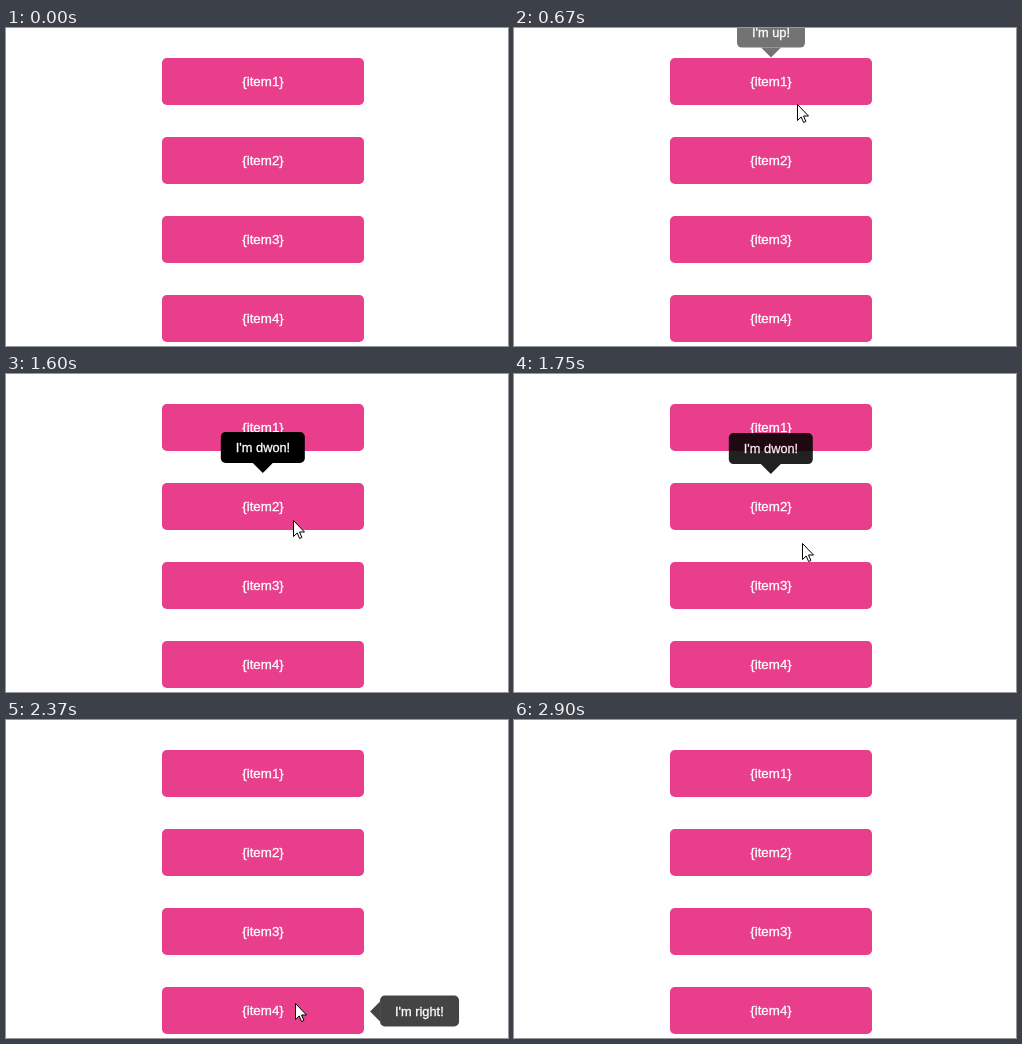
An HTML page for the animation above (3150 ms loop, 502 by 318 pixels).

```html
<!DOCTYPE html>
<html lang="en">
<head>
<meta charset="utf-8">
<title>Tooltips</title>
<style>
  html, body { margin: 0; width: 100%; height: 100%; overflow: hidden; background: #fff; }
  #stage { position: relative; width: 502px; height: 318px; overflow: hidden;
    font-family: "Liberation Sans", Arial, sans-serif; color: #fff; -webkit-text-stroke: .3px #fff; }
  .item { position: absolute; left: 156px; width: 202px; height: 47px; border-radius: 4.8px;
    background: #e83e8c; font-size: 13.333px; line-height: 47px; text-align: center; }
  .tip { position: absolute; height: 31px; padding: 0 15px; border-radius: 4.8px; background: #000;
    font-size: 12.8px; line-height: 31px; white-space: nowrap; }
  .tip::after { content: ""; position: absolute; border: 10px solid transparent; }
  .up { left: 257px; }
  .up::after { left: 50%; margin-left: -10px; top: 100%; border-top-color: #000; border-bottom: 0; }
  .left { right: 366px; }
  .left::after { left: 100%; top: 5.5px; border-left-color: #000; border-right: 0; }
  .right { left: 378px; }
  .right::after { right: 100%; top: 5.5px; border-right-color: #000; border-left: 0; }
  #cursor { position: absolute; left: 0; top: 0; }
</style>
</head>
<body>
<div id="stage">
  <div class="item" style="top:30px">{item1}</div>
  <div class="item" style="top:109px">{item2}</div>
  <div class="item" style="top:188px">{item3}</div>
  <div class="item" style="top:267px">{item4}</div>
  <div class="tip up" style="top:-21px">I'm up!</div>
  <div class="tip up" style="top:58px">I'm dwon!</div>
  <div class="tip left" style="top:196px">I'm left!</div>
  <div class="tip right" style="top:275px">I'm right!</div>
  <svg id="cursor" width="14" height="21">
    <path d="M.5.5V16.5L4.2 13 6.6 18.5 8.9 17.5 6.5 12H11.5Z" fill="#fff" stroke="#000"/>
  </svg>
</div>
<script>
const LOOP = 3150, START = 280, STEP = 77; // the picture advances in 77 ms steps
const FADE = 200, TRAVEL = 22;

// Pointer key points: [step, x, y]
const path = [
  [0, 303, 296], [2, 290, 149], [6, 280, 52], [10, 280, 52], [11, 280, 84], [15, 287, 140],
  [17, 287, 146], [23, 289, 215], [27, 289, 283], [30, 307, 298], [31, 312, 308]
];

// Each tooltip's hovers: [enter, leave] in ms
const hovers = [
  [[600, 1130]],
  [[440, 530], [1240, 1670]],
  [[335, 400], [1800, 2150]],
  [[280, 345], [2263, 2660]]
];

const slides = {
  up: d => `translate(-50%, ${d}px)`,
  left: d => `translate(${d}px, .5px)`,
  right: d => `translate(${-d}px, .5px)`
};

const tips = document.querySelectorAll(".tip");
const cursor = document.getElementById("cursor");

const clamp = v => Math.min(1, Math.max(0, v));
const easeOut = u => u * (2 - u);
const smooth = u => u * u * (3 - 2 * u);

// A short hover fades back from wherever it got to.
function hoverLevel([enter, leave], time) {
  const shown = clamp((Math.min(time, leave) - enter) / FADE);
  return clamp(shown - clamp((time - leave) / FADE));
}

function pointerAt(step) {
  const i = Math.max(1, path.findIndex(point => point[0] >= step));
  const [s0, x0, y0] = path[i - 1], [s1, x1, y1] = path[i];
  const k = (step - s0) / (s1 - s0);
  return [x0 + (x1 - x0) * k, y0 + (y1 - y0) * k].map(Math.round);
}

function draw(now) {
  const step = Math.floor((now % LOOP - START) / STEP);
  const time = START + step * STEP;

  tips.forEach((tip, i) => {
    const opacity = easeOut(Math.max(...hovers[i].map(hover => hoverLevel(hover, time))));
    tip.style.opacity = opacity;
    tip.style.transform = slides[tip.classList[1]](TRAVEL * (1 - smooth(opacity)));
  });

  const visible = step >= 0 && step <= path[path.length - 1][0];
  cursor.style.visibility = visible ? "visible" : "hidden";
  if (visible) {
    const [x, y] = pointerAt(step);
    cursor.style.transform = `translate(${x}px, ${y}px)`;
  }
}

const start = performance.now();
function tick() {
  draw(performance.now() - start);
  requestAnimationFrame(tick);
}
tick();
</script>
</body>
</html>
```
